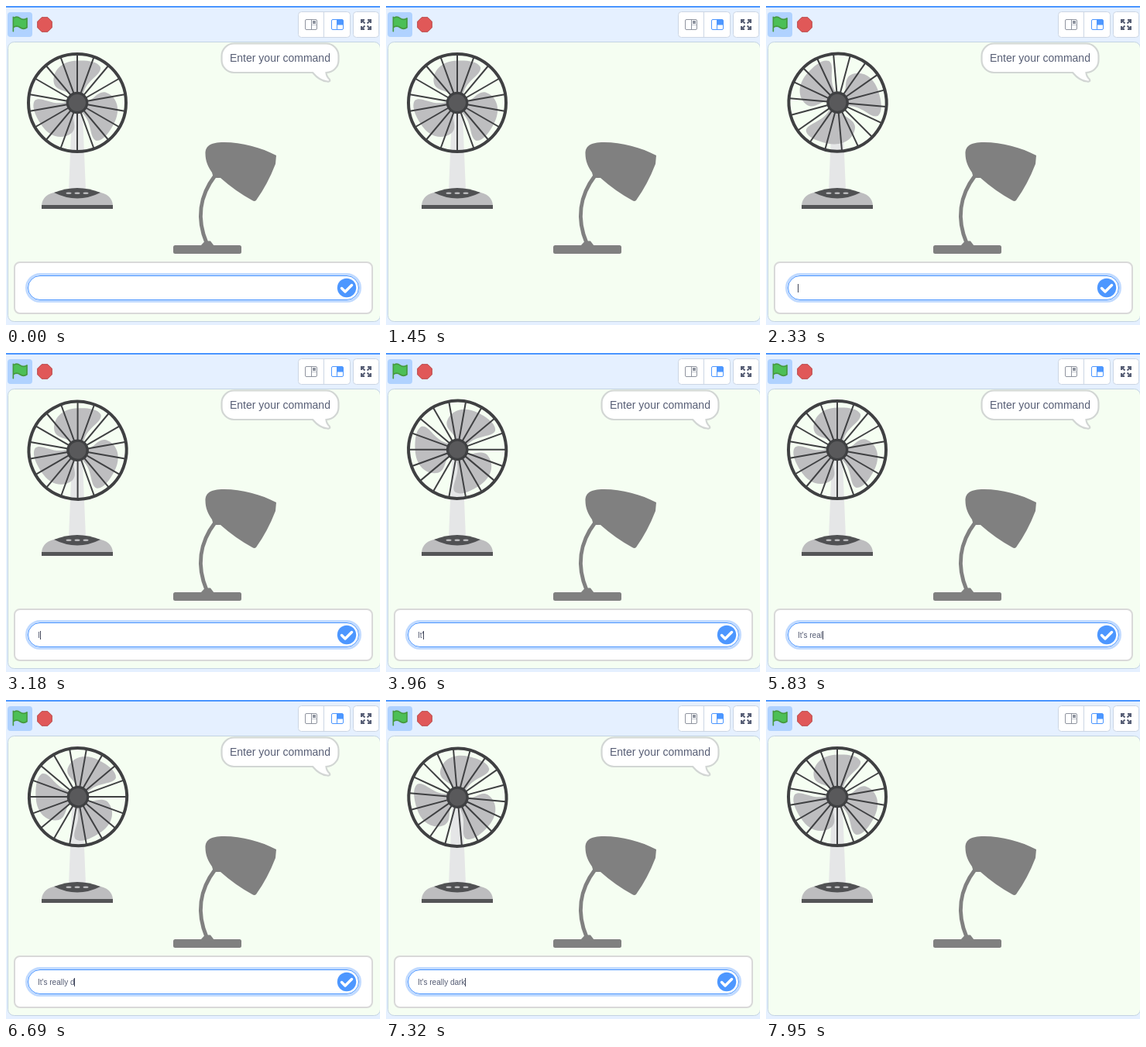
An HTML page for the animation above (8 s loop, 483 by 412 pixels).

```html
<!DOCTYPE html>
<html lang="en">
<head>
<meta charset="utf-8">
<title>Fan and lamp</title>
<style>
  html, body { margin: 0; width: 100%; height: 100%; overflow: hidden; background: #e5f0ff; }
  svg { display: block; }
  text { font-family: "Liberation Sans", Arial, sans-serif; fill: #575e75; white-space: pre; }
</style>
</head>
<body>
<svg width="483" height="412" viewBox="0 0 483 412">
  <rect width="483" height="412" fill="#e5f0ff"/>
  <rect width="483" height="2" fill="#4d97ff"/>

  <!-- toolbar -->
  <rect x="2" y="8" width="32" height="32" rx="4" fill="#b0d2ff"/>
  <g transform="translate(8.5 13.5) scale(1.15)" fill="#4cbf56" stroke="#45993d" stroke-width="1.4" stroke-linecap="round" stroke-linejoin="round">
    <path d="M.75 2A6.44 6.44 0 0 1 8.44 2A6.44 6.44 0 0 0 16.13 2V12.4A6.44 6.44 0 0 1 8.44 12.4A6.44 6.44 0 0 0 .75 12.4M.75 .75V16.75"/>
  </g>
  <path d="M46.1 14.7H53.9L59.3 20.1V27.9L53.9 33.3H46.1L40.7 27.9V20.1Z" fill="#e05858" stroke="#b84848" stroke-linejoin="round"/>
  <g fill="#fff" stroke="#ccd6e4">
    <rect x="377.5" y="7.5" width="67" height="33" rx="4"/>
    <rect x="448.5" y="7.5" width="33" height="33" rx="4"/>
    <path d="M410.5 8V40"/>
  </g>
  <g fill="none" stroke="#8f949f">
    <rect x="386.5" y="17.5" width="15" height="13" rx="1.5"/>
    <path d="M394.5 18V30"/>
    <rect x="396" y="19" width="4" height="4" fill="#8f949f" stroke="none"/>
    <path d="M395 24.5H401" stroke="#c9ccd2"/>
  </g>
  <g fill="none" stroke="#4d97ff">
    <rect x="420.5" y="17.5" width="15" height="13" rx="1.5"/>
    <path d="M427.5 18V30"/>
    <rect x="428" y="18" width="7" height="6.5" fill="#4d97ff" stroke="none"/>
  </g>
  <path d="M459 22V18H463M467 18H471V22M471 26V30H467M463 30H459V26M459.5 18.5L463.5 22.5M470.5 18.5L466.5 22.5M470.5 29.5L466.5 25.5M459.5 29.5L463.5 25.5" fill="none" stroke="#575e75" stroke-width="2"/>

  <rect x="2.5" y="46.5" width="481" height="361" rx="8" fill="#f5fef2" stroke="#c3d3e2"/>

  <!-- fan -->
  <path d="M85.5 130H98.5L103 238H81Z" fill="#e5e6e7"/>
  <path d="M46 257.5Q47 243 66 240H118Q137 243 138 257.5Z" fill="#bdbdbf"/>
  <rect x="46" y="257" width="92" height="5" fill="#545557"/>
  <path d="M62 241Q92 229 122 241Q92 256 62 241Z" fill="#505153"/>
  <g fill="#bdbdbf">
    <ellipse cx="81" cy="241.7" rx="3.5" ry="1.2"/>
    <ellipse cx="92" cy="241.7" rx="3.5" ry="1.2"/>
    <ellipse cx="103" cy="241.7" rx="3.5" ry="1.2"/>
  </g>
  <g id="rotor">
    <g id="blades" fill="#bebec0"></g>
    <g id="spokes" stroke="#3f4042" stroke-width="2"></g>
    <circle r="63" fill="none" stroke="#3f4042" stroke-width="4"/>
    <circle r="14.3" fill="#3f4042"/>
    <circle r="11" fill="#59595b"/>
  </g>

  <!-- lamp -->
  <g fill="#808080">
    <rect x="216" y="309" width="88" height="11" rx="2.5"/>
    <path d="M251 310L257 303.5H264L269 310Z"/>
    <path d="M270 219C250 245 246 275 259 306" fill="none" stroke="#808080" stroke-width="5"/>
    <path d="M257.5 191C257.5 182 262 177 278 176C300 175 329 182 349 193L348 204Q338 230 323 251Q321 253 318 251Q296 239 277 222L268 222L266 215C261 208 257.5 200 257.5 191Z"/>
  </g>

  <g id="bubble">
    <path d="M294.5 48.5H413.5A16 16 0 0 1 429.5 64.5V70A16 16 0 0 1 413.5 86C413.5 90 416 93 418 95C419 97 417 98 415 97.5C407 97 401 92 396 86H294.5A16 16 0 0 1 278.5 70V64.5A16 16 0 0 1 294.5 48.5Z" fill="#fff" stroke="#d2d6d4" stroke-width="2.2"/>
    <text x="289" y="72" font-size="14">Enter your command</text>
  </g>

  <g id="prompt">
    <rect x="11" y="331" width="462" height="66" rx="7" fill="#fff" stroke="#d9d9d9" stroke-width="2"/>
    <rect x="26.5" y="346.5" width="431" height="35" rx="17.5" fill="none" stroke="#c0daff" stroke-width="3"/>
    <rect x="28.5" y="348.5" width="427" height="31" rx="15.5" fill="#fff" stroke="#4d97ff"/>
    <circle cx="440" cy="364" r="12.2" fill="#4d97ff"/>
    <path d="M433.5 364.5L438 369L446.5 360.5" fill="none" stroke="#fff" stroke-width="3.5" stroke-linecap="round" stroke-linejoin="round"/>
    <text id="typed" x="41" y="368" font-size="10"></text>
    <rect id="caret" y="359" width="1" height="11" fill="#404558"/>
  </g>
</svg>

<script>
const LOOP = 8000;
const FAN_START = 1940;
const PIVOT = [92.5, 125.2];
const OFFSET = [-0.5, -0.2];

// Each round: when the prompt opens, when it is submitted, and the time of each key.
const rounds = [
  { open: -600, submit: 1250, text: "It's hot",
    keys: Array.from({ length: 8 }, (_, i) => 50 + i * 125) },
  { open: FAN_START, submit: 7700, text: "It's really dark",
    keys: [3100, 3500, 3900, 4400, 4750, 5050, 5300, 5500, 5750,
           5950, 6200, 6400, 6620, 6850, 7000, 7150] }
];
const BUBBLE_DELAY = 75;
const BLINK = 530;

const $ = id => document.getElementById(id);
const rotor = $("rotor"), bubble = $("bubble"), prompt = $("prompt"),
      typed = $("typed"), caret = $("caret");

const repeat = (count, shape) =>
  Array.from({ length: count }, (_, i) => shape(i * 360 / count)).join("");

$("blades").innerHTML = repeat(3, a =>
  `<path transform="rotate(${a})" d="M-8 -10C-14 -17 -27 -15 -30 -25C-33 -41 -20 -54 0 -54.5C12 -55 26 -54 30 -46C32 -36 12 -30 8 -12Z"/>`);
$("spokes").innerHTML = repeat(18, a =>
  `<line transform="rotate(${a})" y1="-13" y2="-62"/>`);

// The fan turns in 15 degree ticks at a slightly falling rate.
function fanAngle(t) {
  if (t < FAN_START) return 0;
  const u = t - 3180;
  const ticks = Math.floor(0.012657 * u - 1.924e-7 * u * u + 0.5) + 16;
  return 15 * Math.max(0, ticks);
}

const show = (element, on) =>
  element.setAttribute("visibility", on ? "visible" : "hidden");

function draw(t) {
  rotor.setAttribute("transform",
    `translate(${PIVOT}) rotate(${fanAngle(t)}) translate(${OFFSET})`);

  const round = t < FAN_START ? rounds[0] : rounds[1];
  const asking = t < round.submit;
  const pressed = round.keys.filter(k => k <= t);
  const lastKey = pressed.length ? pressed[pressed.length - 1] : round.open;

  show(bubble, t < round.submit + BUBBLE_DELAY);
  show(prompt, asking);
  typed.textContent = round.text.slice(0, pressed.length);
  caret.setAttribute("x", Math.round(41 + (pressed.length ? typed.getComputedTextLength() : 0)));
  show(caret, asking && (t - lastKey) % (2 * BLINK) < BLINK);
}

let start;
function frame(now) {
  start ??= now;
  draw((now - start) % LOOP);
  requestAnimationFrame(frame);
}
draw(0);
requestAnimationFrame(frame);
</script>
</body>
</html>
```
